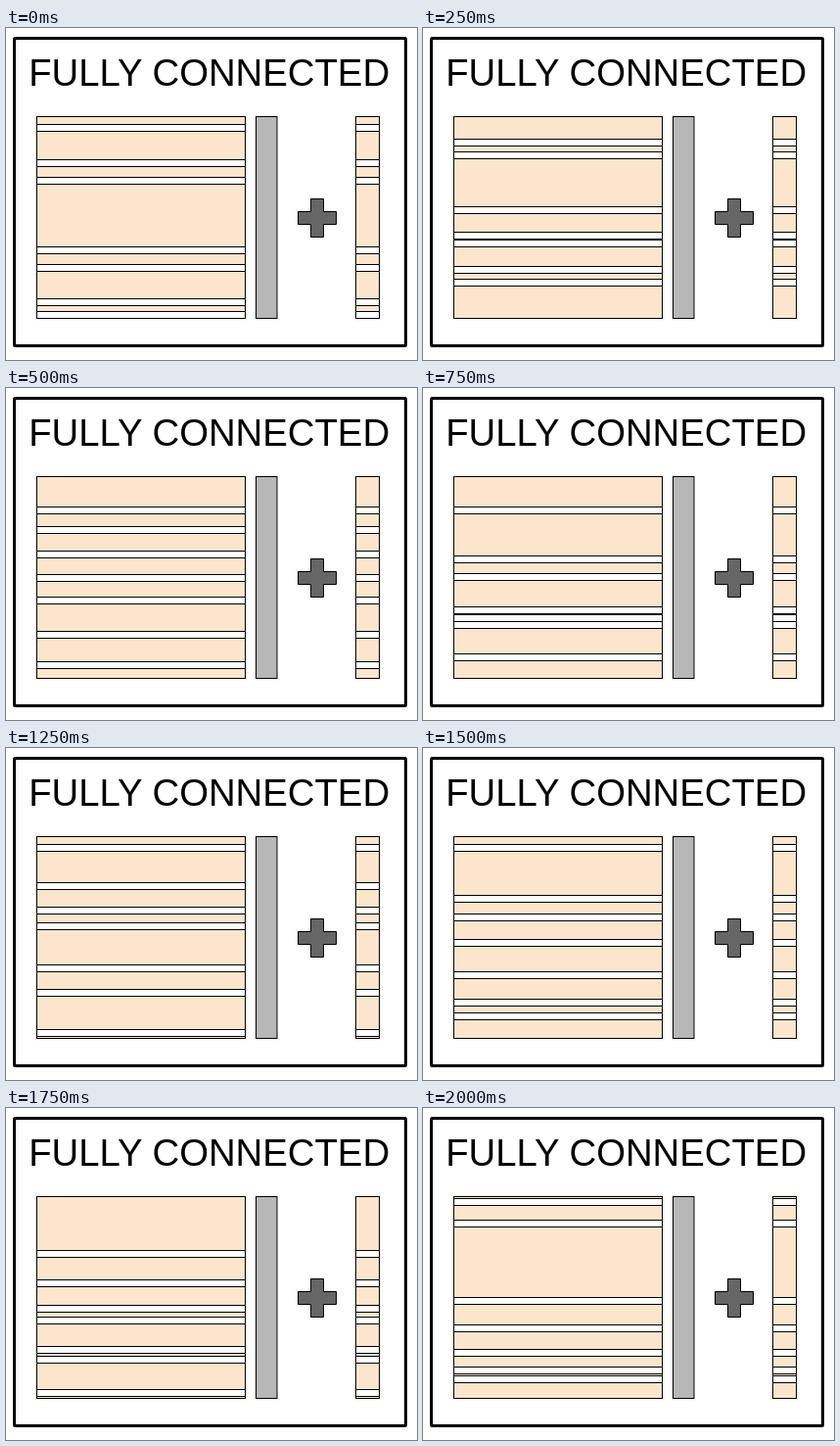
Recreate the animation shown at these times as an HTML page. Size 420 px wide and 339 px high, loop 2250 ms.

```html
<!DOCTYPE html>
<html lang="en">
<head>
<meta charset="utf-8">
<title>Fully connected layer</title>
<style>
  html, body { margin: 0; width: 100%; height: 100%; overflow: hidden; background: #fff; }
  svg { display: block; width: 100%; height: 100%; }
  text { font-family: "Liberation Sans", Arial, sans-serif; font-size: 38.3px; }
  .shape { stroke: #000; stroke-width: 1; }
</style>
</head>
<body>
<svg viewBox="0 0 420 339">
  <rect x="8.5" y="10.5" width="400" height="314" rx="1" fill="#fff" stroke="#000" stroke-width="3"/>
  <text x="23.2" y="59">FULLY CONNECTED</text>
  <g class="shape">
    <rect x="31.5" y="90.5" width="213" height="206" fill="#fce5cd"/>
    <rect x="255.5" y="90.5" width="21.5" height="206" fill="#b7b7b7"/>
    <rect x="357.5" y="90.5" width="24" height="206" fill="#fce5cd"/>
    <path d="M298.5 187.5H311.5V174.5H324.5V187.5H337.5V200.5H324.5V213.5H311.5V200.5H298.5Z" fill="#666"/>
  </g>
  <path id="rows" class="shape" fill="#fff"/>
</svg>
<script>
  const STEP = 250;
  const ROW_HEIGHT = 7;
  const columns = [[31.5, 213], [357.5, 24]];

  // Top edges of the dropped rows in each step
  const steps = [
    [98, 134, 152, 223, 241, 276, 289],
    [113, 126, 182, 208, 216, 243, 256],
    [121, 141, 166, 190, 213, 248, 279],
    [121, 171, 189, 223, 231, 238, 271],
    [105, 129, 158, 187, 216, 261, 271],
    [98, 137, 162, 178, 221, 246, 287],
    [98, 150, 169, 195, 228, 256, 270],
    [145, 175, 201, 213, 243, 253, 287],
    [92, 114, 193, 221, 246, 264, 273]
  ];

  const rows = document.getElementById("rows");
  const box = (x, y, w) => `M${x} ${y + 0.5}h${w}v${ROW_HEIGHT}h${-w}z`;
  const start = performance.now();
  let shown = -1;

  function draw(now) {
    const step = Math.floor(Math.max(0, now - start) / STEP) % steps.length;
    if (step !== shown) {
      shown = step;
      rows.setAttribute("d", steps[step].map(y =>
        columns.map(([x, w]) => box(x, y, w)).join("")).join(""));
    }
    requestAnimationFrame(draw);
  }

  draw(start);
</script>
</body>
</html>
```
